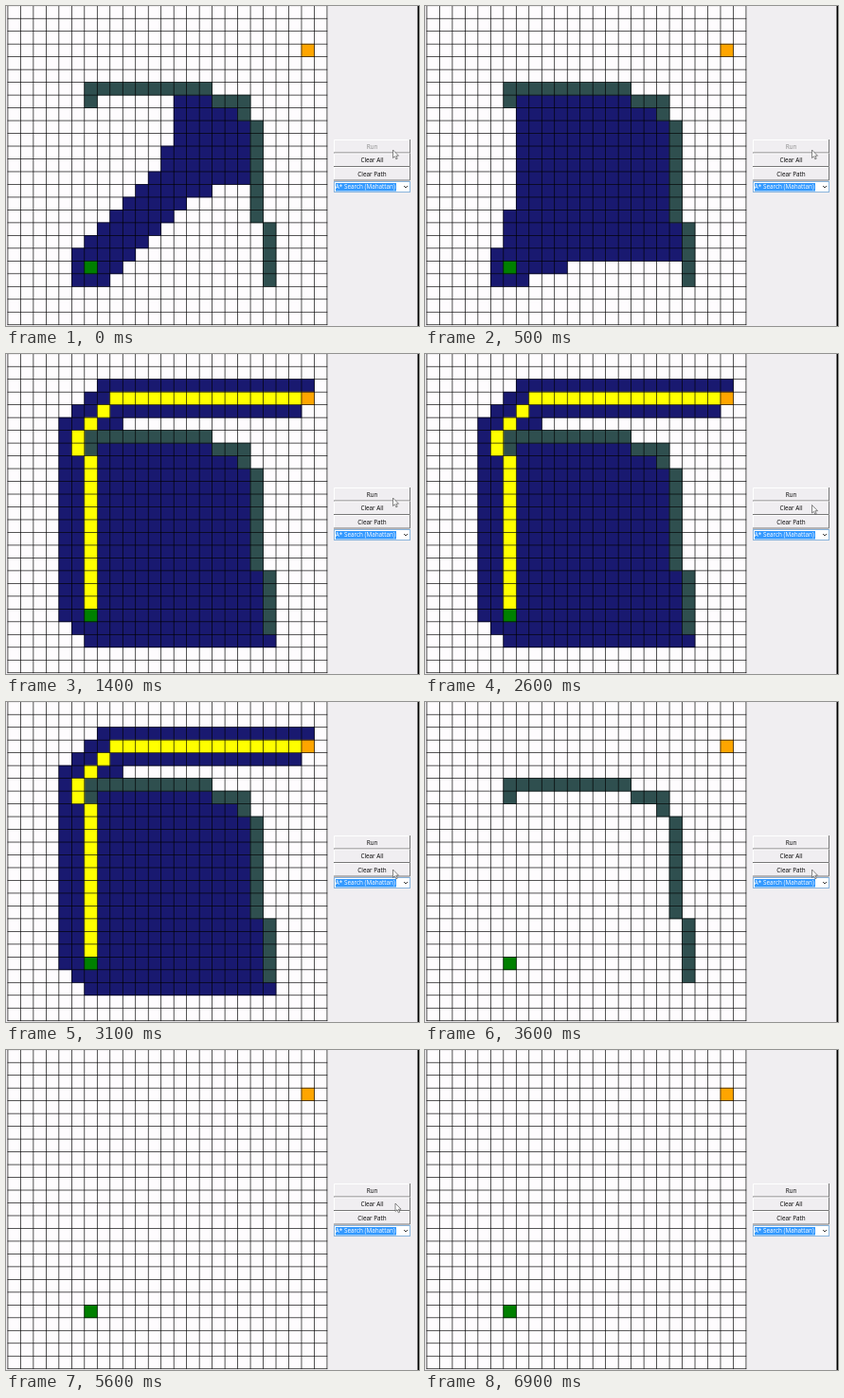
An HTML page with a canvas that plays this animation: 436 by 338 pixels, repeating every 7.5 s.

```html
<!DOCTYPE html>
<html lang="en">
<head>
<meta charset="utf-8">
<title>Path search</title>
<style>
  html, body { margin: 0; width: 100%; height: 100%; overflow: hidden; background: #f0eef1; }
  canvas, svg { position: absolute; left: 0; top: 0; }
  text { font: 6.35px "Open Sans", "Noto Sans", sans-serif; }
</style>
</head>
<body>
<canvas id="board" width="436" height="338"></canvas>
<svg width="436" height="338" viewBox="0 0 436 338">
  <rect x="434.5" width="1.5" height="338"/>
  <g id="buttons"></g>
  <rect x="346.5" y="185.5" width="80" height="11" fill="#fff" stroke="#8ab4dc"/>
  <rect x="348" y="187" width="64" height="8.5" fill="#3399ff"/>
  <text x="347.8" y="193.4" fill="#fff">A* Search (Mahattan)</text>
  <path d="M420 190l2 2 2-2" fill="none" stroke="#444"/>
  <path id="cursor" d="M0 0V8.5L2 6.7 3.3 9.8 4.7 9.2 3.4 6.2H6Z" fill="#fff" stroke="#555" stroke-width=".7"/>
</svg>
<script>
const LOOP = 7500, SIZE = 25, CELL = 13.48, LINE = 0.67, LEFT = 1.6, TOP = -0.6;
const ctx = document.getElementById('board').getContext('2d');
const cursor = document.getElementById('cursor');

// corner cells of the wall and of the route found
const wall = trace([6, 7], [6, 6], [15, 6], [16, 7], [18, 7], [18, 8], [19, 9], [19, 16], [20, 17], [20, 21]);
const route = trace([22, 3], [8, 3], [5, 6], [5, 7], [6, 8], [6, 19]);

// cursor steps: start time, x, y
const moves = [[0, 408.5, 152], [2600, 408.5, 159.5], [3000, 421, 175], [3100, 408.5, 177],
  [4700, 421, 180.5], [4900, 411, 162], [6400, 416, 174], [6500, 421, 186], [6900, -20, -20]];
// four search steps, search done, route shown, path cleared, all cleared
const phases = [0, 100, 500, 1000, 1100, 1400, 3600, 5600];

document.getElementById('buttons').innerHTML = ['Run', 'Clear All', 'Clear Path'].map((label, i) => {
  const y = 141 + i * 14.5;
  return `<path d="M346.5 ${y + 14}V${y + .5}H426" fill="none" stroke="#fff"/>
    <path d="M346 ${y + 14}H426.5V${y}" fill="none" stroke="#777"/>
    <text x="386.5" y="${y + 9.5}" text-anchor="middle">${label}</text>`;
}).join('');
const run = document.querySelector('#buttons text');

// every cell on a straight or diagonal walk through the corners
function trace(...corners) {
  let [c, r] = corners[0];
  const cells = [[c, r]];
  for (const [toC, toR] of corners)
    while (c !== toC || r !== toR)
      cells.push([c += Math.sign(toC - c), r += Math.sign(toR - r)]);
  return cells;
}

// last open column before the wall on the right
function edge(row) {
  const columns = wall.filter(([c, r]) => r === row && c > 6).map(([c]) => c);
  return Math.min(21, ...columns) - 1;
}

// first and last column explored in row r
function explored(phase, r) {
  if (phase > 2) {
    const first = phase === 3 ? 5 : 2;
    if (r < first || r > 22) return [0, -1];
    const tip = phase === 4 ? 16 : r === 2 ? 23 : 22;
    return [Math.max(4, 9 - r, r - 16), r < 5 ? tip : r < 7 ? 8 : edge(r)];
  }
  if (r < 7 || r > 21) return [0, -1];
  const left = Math.max(5, Math.min(13, (r < 12 ? 23 : 24) - r));
  const right = r < 14 ? edge(r) : (r < 15 ? 29 : 28) - r;
  if (phase === 0) return [left, right];
  if (phase === 1) return r < 17 ? [Math.min(10, left), edge(r)] : [left, right];
  return [r < 16 ? 7 : r < 19 ? 6 : 5, r < 20 ? edge(r) : r === 20 ? 10 : 7];
}

function fill(color, cells) {
  ctx.fillStyle = color;
  for (const [c, r, w = 1] of cells)
    ctx.fillRect(LEFT + c * CELL, TOP + r * CELL, w * CELL + LINE, CELL + LINE);
}

function drawBoard(phase) {
  const end = SIZE * CELL + LINE;
  ctx.clearRect(0, 0, 436, 338);
  ctx.fillStyle = '#fefcfe';
  ctx.fillRect(LEFT, TOP, end, end);
  if (phase < 6) {
    for (let r = 0; r < SIZE; r++) {
      const [a, b] = explored(phase, r);
      fill('#191970', [[a, r, b - a + 1]].filter(() => b >= a));
    }
  }
  if (phase < 7) fill('#2f4f4f', wall);
  if (phase === 5) fill('#ff0', route);
  fill('#008000', [[6, 20]]);
  fill('#ffa500', [[23, 3]]);
  ctx.fillStyle = '#000';
  for (let i = 0; i <= SIZE; i++) {
    ctx.fillRect(LEFT + i * CELL, TOP, LINE, end);
    ctx.fillRect(LEFT, TOP + i * CELL, end, LINE);
  }
}

let shown = -1;
function frame(now) {
  const t = now % LOOP;
  const phase = phases.findLastIndex(start => start <= t);
  if (phase !== shown) {
    drawBoard(shown = phase);
    run.setAttribute('fill', phase < 5 ? '#8a8a8a' : '#000');
  }
  const [, x, y] = moves.findLast(([start]) => start <= t);
  cursor.setAttribute('transform', `translate(${x} ${y})`);
  requestAnimationFrame(frame);
}
frame(0);
</script>
</body>
</html>
```
